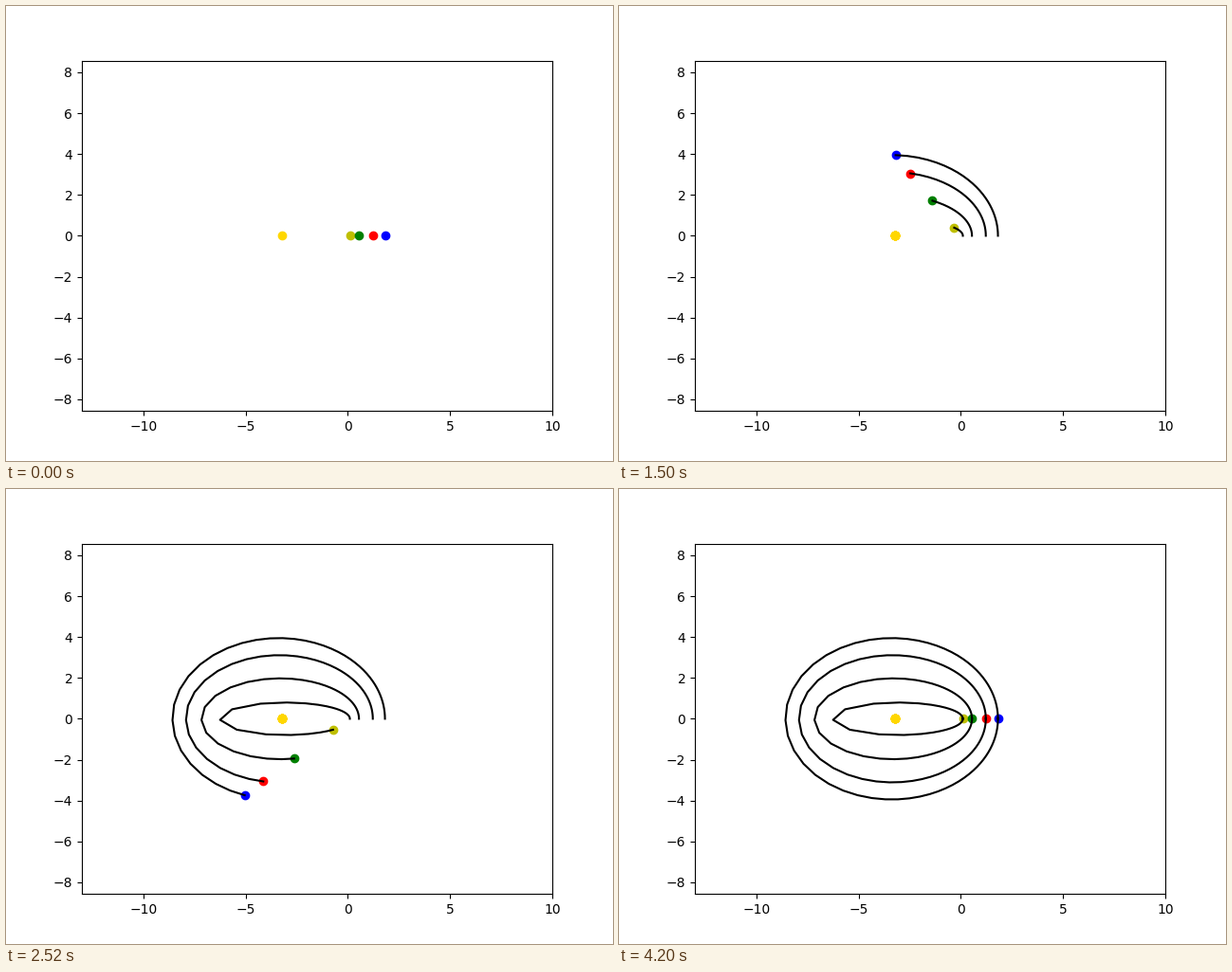
Write a matplotlib script that moves like this. It is 640 px wide and 480 px high and loops after 4260 ms.

```python
import numpy as np
import matplotlib.pyplot as plt
from matplotlib.animation import FuncAnimation

FRAMES = 71
STEP = 0.09  # radians swept per frame
SUN_X = -3.2
# colour, semi-latus rectum, eccentricity
ORBITS = [
    ("y", 0.2, 0.968),
    ("g", 1.016, 0.858),
    ("r", 2.12, 0.732),
    ("b", 3.0, 0.65),
]


def ellipse(p, e):
    """Points of an orbit with one focus at the origin."""
    theta = STEP * np.arange(FRAMES)
    r = p / (1 + e * np.cos(theta))
    return r * np.cos(theta), r * np.sin(theta)


fig, ax = plt.subplots(figsize=(6.4, 4.8), dpi=100)
half = 11.5 * 369.6 / 496  # equal scale on both axes
ax.set_xlim(-13, 10)
ax.set_ylim(-half, half)

sun, = ax.plot([], [], "o", color="gold")
paths = [ellipse(p, e) for _, p, e in ORBITS]
planets = [ax.plot([], [], "o", color=c)[0] for c, _, _ in ORBITS]
trails = [ax.plot([], [], "k", zorder=3)[0] for _ in ORBITS]


def update(i):
    # the sun is stamped again on each early frame, which hardens its edge
    n = min(i + 1, 10)
    sun.set_data([SUN_X] * n, [0] * n)
    for (x, y), planet, trail in zip(paths, planets, trails):
        planet.set_data([x[i]], [y[i]])
        end = i + 1 if i else 0
        trail.set_data(x[:end], y[:end])
    return [sun, *planets, *trails]


anim = FuncAnimation(fig, update, frames=FRAMES, interval=60,
                     repeat=True, repeat_delay=0, blit=False)
plt.show()
```
